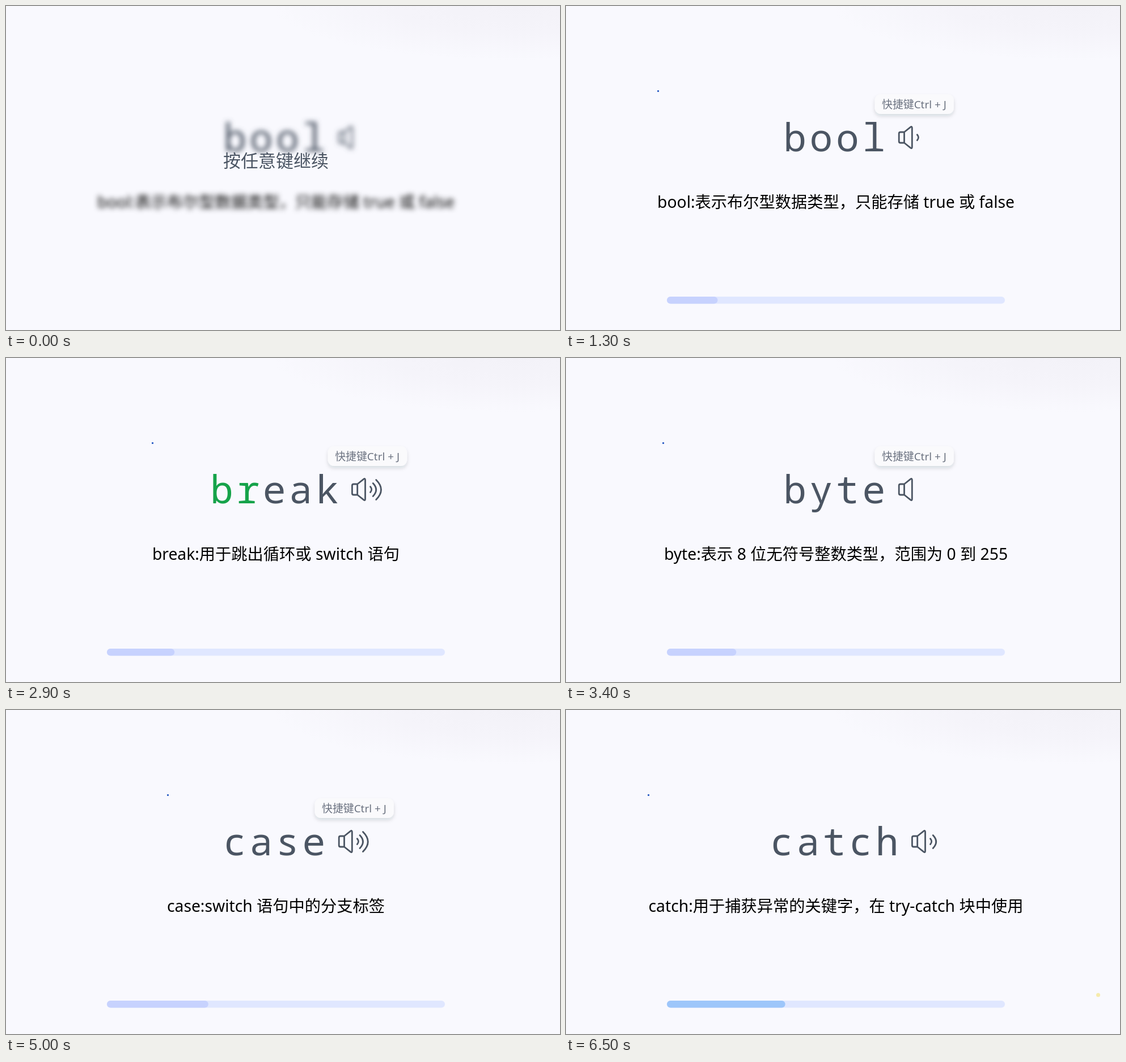
Animation of 977 by 573 pixels, one loop 6700 ms. Source, as an HTML page:

```html
<!DOCTYPE html>
<html lang="zh-CN">
<head>
<meta charset="utf-8">
<title>Keyword typing</title>
<style>
  html, body { margin: 0; width: 100%; height: 100%; overflow: hidden; background: #f9f9fe; }
  svg { display: block; width: 977px; height: 573px; }
  text { font-family: "Noto Sans", "Noto Sans CJK SC", sans-serif; white-space: pre; }
  #word { font: 500 68px "Noto Sans Mono", "DejaVu Sans Mono", monospace; letter-spacing: 5.6px; }
  #desc { font-size: 28.25px; text-anchor: middle; }
  #hint { font-size: 31px; text-anchor: middle; fill: #4b5563; }
  #tip text { font-size: 18.9px; fill: #6b7280; }
  #icon { fill: none; stroke: #4b5563; stroke-width: 2.8; stroke-linecap: round; stroke-linejoin: round; }
</style>
</head>
<body>
<svg viewBox="0 0 977 573">
  <defs>
    <radialGradient id="shade">
      <stop offset="0" stop-color="#f3f2f8"/>
      <stop offset=".5" stop-color="#f5f4fa"/>
      <stop offset="1" stop-color="#f9f9fe"/>
    </radialGradient>
    <filter id="blur" x="-10%" y="-30%" width="120%" height="160%">
      <feGaussianBlur stdDeviation="4.6"/>
    </filter>
    <filter id="shadow" x="-20%" y="-50%" width="140%" height="220%">
      <feDropShadow dx="0" dy="4" stdDeviation="3" flood-color="#1f2937" flood-opacity=".14"/>
    </filter>
  </defs>
  <rect width="977" height="573" fill="#f9f9fe"/>
  <ellipse cx="900" cy="0" rx="430" ry="96" fill="url(#shade)"/>

  <g id="content">
    <text id="word" y="257"></text>
    <g id="icon">
      <path d="M596.5 223H590Q587.2 223 587.2 225.5V239.5Q587.2 242 590 242H596.5ZM596.5 223L607.3 214.3Q610.3 212 610.3 215.5V249.5Q610.3 253 607.3 250.7L596.5 242"/>
      <path class="wave" d="M619.3 227.5Q623.7 232.5 619.3 237.5"/>
      <path class="wave" d="M624 221.5Q635 233 624 244.5"/>
      <path class="wave" d="M629.5 215.5Q647 233 629.5 250.5"/>
    </g>
    <text id="desc" x="476" y="357"></text>
  </g>

  <g id="tip">
    <rect x="544.5" y="156" width="139.5" height="35" rx="11" fill="#fafafc" filter="url(#shadow)"/>
    <text x="557" y="180.5">快捷键Ctrl + J</text>
  </g>
  <g id="panel">
    <rect id="dot" y="149" width="3" height="3" fill="#3867c8"/>
    <rect x="178" y="514" width="596" height="12.5" rx="6.25" fill="#e0e7ff"/>
    <rect id="bar" x="178" y="514" height="12.5" rx="6.25"/>
  </g>
  <text id="hint" x="476" y="284.5">按任意键继续</text>
  <circle id="spark" cx="938.5" cy="504" r="3.5" fill="#f6ebac"/>
</svg>

<script>
const LOOP = 6700, START = 800, PITCH = 46.4, TRACK = 596;

// start: when the word appears; keys: when each letter is typed
const WORDS = [
  { name: 'bool', start: 0, keys: [1700, 1900, 2000, 2100], dot: 161, text: '表示布尔型数据类型，只能存储 true 或 false' },
  { name: 'break', start: 2200, keys: [2600, 2900, 3000, 3100], dot: 257, text: '用于跳出循环或 switch 语句' },
  { name: 'byte', start: 3400, keys: [4100, 4200, 4400], dot: 170, text: '表示 8 位无符号整数类型，范围为 0 到 255' },
  { name: 'case', start: 4600, keys: [5200, 5300, 5500], dot: 284, text: 'switch 语句中的分支标签' },
  { name: 'catch', start: 5600, keys: [], dot: 144, text: '用于捕获异常的关键字，在 try-catch 块中使用' }
];
// [time, number of visible sound waves]
const WAVES = [[0, 0], [1200, 1], [1700, 2], [2700, 3], [3200, 0], [3900, 1],
  [4400, 2], [5000, 3], [5500, 0], [6100, 1], [6500, 2]];

const $ = id => document.getElementById(id);
const clamp = v => Math.max(0, Math.min(1, v));
const smooth = v => v * v * (3 - 2 * v);
const show = (el, on) => el.setAttribute('visibility', on ? 'visible' : 'hidden');
const waves = document.querySelectorAll('.wave');
let shownWord = -1;

function setWord(index) {
  if (index === shownWord) return;
  shownWord = index;
  const { name, text, dot } = WORDS[index];
  const shift = (name.length - 4) * PITCH / 2;
  $('word').innerHTML = [...name].map(c => `<tspan>${c}</tspan>`).join('');
  $('word').setAttribute('x', 383.2 - shift);
  $('desc').textContent = `${name}:${text}`;
  $('dot').setAttribute('x', dot);
  for (const id of ['icon', 'tip']) $(id).setAttribute('transform', `translate(${shift} 0)`);
}

function draw(t) {
  const active = t >= START;
  const index = WORDS.findLastIndex(w => t >= w.start);
  const word = WORDS[index];
  setWord(index);

  [...$('word').children].forEach((letter, i) =>
    letter.setAttribute('fill', t >= word.keys[i] ? '#16a34a' : '#4b5563'));

  const level = WAVES.findLast(w => t >= w[0])[1];
  waves.forEach((wave, i) => show(wave, i < level));

  const step = index ? smooth(clamp((t - word.start + 50) / 250)) : 1;
  $('bar').setAttribute('width', TRACK * (0.1 + 0.05 * (index + step)));
  $('bar').setAttribute('fill', word.name === 'catch' ? '#9dc6fa' : '#c7d2fe');

  const fadeIn = clamp(0.45 + (t - START) / 700);
  const fadeOut = clamp((6500 - t) / 300);
  $('tip').setAttribute('opacity', active ? Math.min(fadeIn, fadeOut) : 0);

  $('content').setAttribute('filter', active ? 'none' : 'url(#blur)');
  show($('panel'), active);
  show($('hint'), !active);
  show($('spark'), t >= 6400);
}

const origin = performance.now();
function tick() {
  const t = (performance.now() - origin) % LOOP;
  draw(Math.floor(t / 100) * 100);
  requestAnimationFrame(tick);
}
tick();
</script>
</body>
</html>
```
